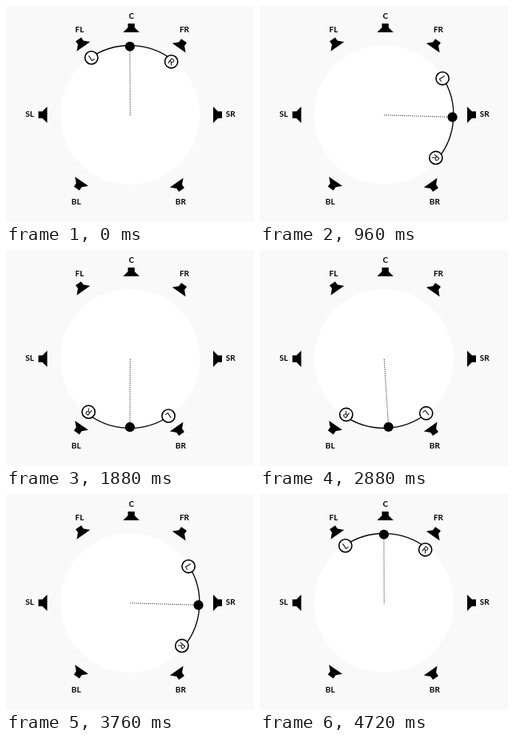
Recreate the animation shown at these times as an HTML page with a canvas. Size 310 by 271 pixels, loop 5760 ms.

```html
<!DOCTYPE html>
<html lang="en">
<head>
<meta charset="utf-8">
<title>Surround panning</title>
<style>
  html, body { margin: 0; width: 100%; height: 100%; overflow: hidden; background: #f9f9f9; }
  canvas { display: block; width: 310px; height: 271px; }
</style>
</head>
<body>
<canvas id="stage"></canvas>
<script>
const WIDTH = 310, HEIGHT = 271;
const CX = 154.9, CY = 136.5;
const RING = 87, DOT_ORBIT = 85.7;
const STEP_MS = 40, LOOP_MS = 5760, SWEEP_STEPS = 47, RETURN_STEP = 71;
const RAD = Math.PI / 180;

const canvas = document.getElementById('stage');
const ctx = canvas.getContext('2d');
const scale = window.devicePixelRatio || 1;
canvas.width = WIDTH * scale;
canvas.height = HEIGHT * scale;

// x, y: middle of the wide edge; turn: clockwise from facing down
const speakers = [
  { label: 'C',  x: 156.6, y: 33,    turn: 0,   lx: 156.7, ly: 15.5 },
  { label: 'FL', x: 96.8,  y: 50.8,  turn: -35, lx: 92,    ly: 33 },
  { label: 'FR', x: 216.2, y: 52.6,  turn: 35,  lx: 223,   ly: 33 },
  { label: 'SL', x: 51.5,  y: 136.5, turn: -90, lx: 29.5,  ly: 139.3 },
  { label: 'SR', x: 259,   y: 136.5, turn: 90,  lx: 280.7, ly: 139.3 },
  { label: 'BL', x: 94.6,  y: 220,   turn: 215, lx: 87.7,  ly: 249 },
  { label: 'BR', x: 213.2, y: 221.6, turn: 145, lx: 218.3, ly: 249 }
];

const ears = [
  { letter: 'L', offset: -33.9, orbit: 86.3 },
  { letter: 'R', offset: 37.8,  orbit: 84.4 }
];

// Angles are in degrees, clockwise from the top
function polar(angle, radius) {
  return [CX + radius * Math.sin(angle * RAD), CY - radius * Math.cos(angle * RAD)];
}

function disc(x, y, radius, color) {
  ctx.beginPath();
  ctx.arc(x, y, radius, 0, 2 * Math.PI);
  ctx.fillStyle = color;
  ctx.fill();
}

function text(string, x, y, font) {
  ctx.font = font;
  ctx.fillStyle = '#000';
  ctx.textAlign = 'center';
  ctx.fillText(string, x, y);
}

function drawSpeaker({ label, x, y, turn, lx, ly }) {
  ctx.save();
  ctx.translate(x, y);
  ctx.rotate(turn * RAD);
  ctx.fillStyle = '#000';
  ctx.beginPath();
  ctx.moveTo(-10.2, 0);
  ctx.lineTo(-4.2, -6);
  ctx.lineTo(-4.2, -11);
  ctx.lineTo(4.2, -11);
  ctx.lineTo(4.2, -6);
  ctx.lineTo(10.2, 0);
  ctx.fill();
  ctx.restore();
  text(label, lx, ly, 'bold 10px Lato, sans-serif');
}

function drawEar({ letter, offset, orbit }, angle) {
  const [x, y] = polar(angle + offset, orbit);
  disc(x, y, 8.1, '#fff');
  ctx.lineWidth = 1.6;
  ctx.stroke();
  ctx.save();
  ctx.translate(x, y);
  ctx.rotate((angle + offset) * RAD);
  text(letter, 0, 3.9, '11px Lato, sans-serif');
  ctx.restore();
}

function drawPanner(angle) {
  const [x, y] = polar(angle, DOT_ORBIT);
  ctx.strokeStyle = '#000';

  ctx.lineWidth = 1;
  ctx.setLineDash([1, 1.5]);
  ctx.beginPath();
  ctx.moveTo(CX + 0.3, CY + 0.3);
  ctx.lineTo(x, y);
  ctx.stroke();
  ctx.setLineDash([]);

  ctx.lineWidth = 1.3;
  ctx.beginPath();
  ctx.arc(CX, CY, RING, (angle + ears[0].offset - 90) * RAD, (angle + ears[1].offset - 90) * RAD);
  ctx.stroke();

  disc(x, y, 6.1, '#000');
  ears.forEach(ear => drawEar(ear, angle));
}

function angleAt(ms) {
  const step = Math.floor((ms % LOOP_MS) / STEP_MS + 1e-6);
  const out = Math.min(step, SWEEP_STEPS);
  const back = Math.min(Math.max(step - RETURN_STEP, 0), SWEEP_STEPS);
  return (out - back) * 180 / SWEEP_STEPS;
}

function draw(ms) {
  ctx.setTransform(scale, 0, 0, scale, 0, 0);
  ctx.fillStyle = '#f9f9f9';
  ctx.fillRect(0, 0, WIDTH, HEIGHT);
  disc(CX, CY, 87.3, '#fff');
  speakers.forEach(drawSpeaker);
  drawPanner(angleAt(ms));
}

const start = performance.now();
function tick() {
  draw(performance.now() - start);
  requestAnimationFrame(tick);
}
tick();
</script>
</body>
</html>
```
